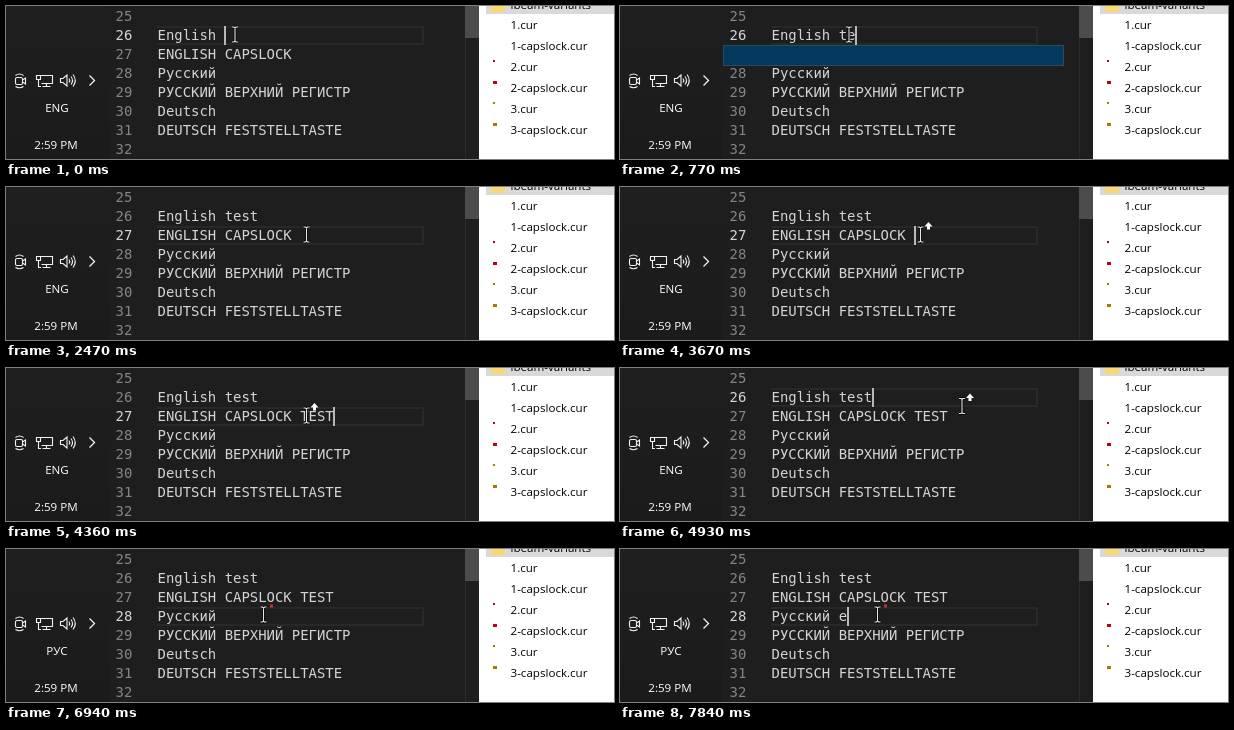
Recreate the animation shown at these times as an HTML page. Size 608x153 px, loop 7.99 s.

```html
<!DOCTYPE html>
<html lang="en">
<head>
<meta charset="utf-8">
<title>Text cursor by input language</title>
<style>
html, body { margin: 0; width: 100%; height: 100%; overflow: hidden; background: #1e1e1e; }
#stage { position: relative; width: 608px; height: 153px; overflow: hidden; background: #1e1e1e; }
#stage div, #stage svg { position: absolute; }
.ui { font: 11.6px/20px "Open Sans", "Noto Sans", sans-serif; white-space: pre; }
.tray { left: 0; top: 0; width: 103px; height: 153px; background: linear-gradient(#1f1f1f, #1b1b1c); }
.tray .ui { left: 0; width: 102px; color: #fff; text-align: center; }
.row { left: 0; height: 19px; font: 13.95px/19px "DejaVu Sans Mono", "Noto Sans Mono", monospace; white-space: pre; }
.num { left: 109.5px; color: #858585; }
.num.on { color: #d6d6d6; }
.code { left: 151.5px; color: #d4d4d4; }
#line { left: 151px; width: 265px; height: 15px; border: solid #282828; border-width: 2px 2px 2px 0; }
#caret { width: 2px; height: 19px; background: #b8b9b7; }
#popup { left: 103px; top: 39px; width: 341px; height: 21px; box-sizing: border-box; background: #04395e; border: 1px solid #2b4a62; }
.ruler { left: 459px; top: 0; width: 1px; height: 153px; background: #2b2b2b; }
.thumb { left: 459px; top: 0; width: 14px; height: 32px; background: #4c4c4c; }
.files { left: 473px; top: 0; width: 135px; height: 153px; background: #fff; overflow: hidden; }
.files .ui { left: 31.5px; color: #000; }
.head { left: 7px; top: 0; width: 128px; height: 8px; background: #d9d9d9; }
.folder { left: 12px; top: 0; width: 14px; height: 6px; background: #f8d775; }
.dot { left: 14px; width: 2px; height: 2px; }
.dot.caps { width: 4px; height: 3px; }
#pointer { left: 0; top: 0; overflow: visible; }
</style>
</head>
<body>
<div id="stage">
  <div id="line"></div>
  <div id="rows"></div>
  <div id="caret"></div>
  <div id="popup"></div>
  <div class="ruler"></div>
  <div class="thumb"></div>
  <div class="tray">
    <svg width="103" height="153" fill="none" stroke="#f0f0f0" stroke-width="1.1">
      <rect x="9.5" y="71.5" width="7" height="7" rx="1.5"/>
      <path d="M16.5 74l3-2v6l-3-2M9.5 69.5q4-3 8 0M9.5 80.5q4 2.5 8 0"/>
      <path d="M33.5 69.5H46.5V77.5H35.5M40.5 77.5V80.5M36.5 80.5H44.5M30.5 69.5H34.5V73.5H30.5ZM32.5 73.5V80.5H35"/>
      <path d="M54.5 72.5H57L61 69V80L57 76.5H54.5ZM63 72.5q1.5 2 0 4M65 70.5q3 4 0 8M67 68.5q4.5 6 0 12"/>
      <path d="M83.5 69.5l5 5l-5 5" stroke-width="1.3"/>
    </svg>
    <div class="ui" id="lang" style="top:92px"></div>
    <div class="ui" style="top:129px; left:-1px">2:59 PM</div>
  </div>
  <div class="files" id="files">
    <div class="head"></div>
    <div class="folder"></div>
    <div class="ui" style="top:-11px">ibeam-variants</div>
  </div>
  <svg id="pointer" width="1" height="1">
    <defs>
      <path id="beam" fill="none" d="M-3 -7.5H-1L0 -6.5L1 -7.5H3M0 -6.5V6.5M-3 7.5H-1L0 6.5L1 7.5H3"/>
    </defs>
    <use href="#beam" stroke="#000" stroke-width="2.6"/>
    <use href="#beam" stroke="#e8e8e8" stroke-width="1.1"/>
    <path id="arrow" d="M8 -12.5L12 -8H9.5V-5H6.5V-8H4Z"/>
    <rect id="mark" x="6.5" y="-10" width="3" height="3" fill="#c8322c"/>
  </svg>
</div>
<script>
const $ = id => document.getElementById(id);
const LOOP = 7990, CHAR = 8.4, LEFT = 151;
const rowTop = n => 1 + (n - 25) * 19;

function add(parent, cls, y, text = "") {
  const el = document.createElement("div");
  el.className = cls;
  el.style.top = y + "px";
  el.textContent = text;
  parent.appendChild(el);
  return el;
}

const base = {
  26: "English ", 27: "ENGLISH CAPSLOCK ", 28: "Русский ",
  29: "РУССКИЙ ВЕРХНИЙ РЕГИСТР", 30: "Deutsch", 31: "DEUTSCH FESTSTELLTASTE"
};
const nums = {}, code = {};
for (let n = 25; n <= 32; n++) {
  nums[n] = add($("rows"), "row num", rowTop(n), n);
  code[n] = add($("rows"), "row code", rowTop(n), base[n]);
}

const dotColours = ["", "#c00018", "#a87800"];
dotColours.forEach((colour, i) => ["", "-capslock"].forEach((suffix, j) => {
  const y = 9 + (i * 2 + j) * 21;
  add($("files"), "ui", y, i + 1 + suffix + ".cur");
  if (colour) add($("files"), j ? "dot caps" : "dot", y + 3).style.background = colour;
}));

// Each step changes only the listed fields.
const steps = [
  [0, { line: 26, caret: 1, x: 229, y: 28.5, t26: "", t27: "", t28: "", popup: 0, lang: "ENG", arrow: "", mark: 0 }],
  [250, { caret: 0 }],
  [770, { caret: 1, t26: "te", popup: 1 }],
  [890, { t26: "tes" }],
  [1020, { t26: "test" }],
  [1150, { popup: 0 }],
  [1290, { x: 246, y: 33 }],
  [1420, { x: 281, y: 41 }],
  [1560, { x: 298, y: 44, caret: 0 }],
  [1700, { x: 300, y: 47, line: 27, caret: 1 }],
  [1830, { x: 300.5, y: 47.5 }],
  [2100, { caret: 0 }],
  [2620, { caret: 1 }],
  [2780, { arrow: "#fff" }],
  [3150, { caret: 0 }],
  [3670, { caret: 1 }],
  [3960, { t27: "T" }],
  [4090, { t27: "TE" }],
  [4230, { t27: "TES" }],
  [4360, { t27: "TEST" }],
  [4500, { x: 308, y: 45 }],
  [4640, { x: 326, y: 41 }],
  [4780, { x: 340, y: 38.5 }],
  [4930, { x: 342, y: 38, line: 26 }],
  [5090, { x: 326, y: 45 }],
  [5220, { x: 288, y: 57 }],
  [5350, { x: 262, y: 64, caret: 0 }],
  [5480, { x: 257.5, y: 65.5, line: 28, caret: 1 }],
  [5990, { caret: 0 }],
  [6370, { lang: "РУС" }],
  [6510, { caret: 1, arrow: "#d8302c" }],
  [6940, { caret: 0, arrow: "", mark: 1 }],
  [7440, { caret: 1 }],
  [7840, { t28: "е" }]
];

const show = (el, on) => { el.style.visibility = on ? "visible" : "hidden"; };

function draw(s) {
  for (const n of [26, 27, 28]) {
    code[n].textContent = base[n] + s["t" + n];
    nums[n].classList.toggle("on", n === s.line);
  }
  const y = rowTop(s.line);
  $("line").style.top = y + "px";
  $("caret").style.top = y + "px";
  $("caret").style.left = Math.round(LEFT + code[s.line].textContent.length * CHAR) + "px";
  show($("caret"), s.caret);
  show($("popup"), s.popup);
  $("lang").textContent = s.lang;
  $("pointer").style.transform = `translate(${s.x}px, ${s.y}px)`;
  $("arrow").setAttribute("fill", s.arrow || "none");
  show($("mark"), s.mark);
}

let last = -1;
function tick() {
  const t = performance.now() % LOOP;
  const past = steps.filter(([at]) => at <= t);
  if (past.length !== last) {
    last = past.length;
    draw(Object.assign({}, ...past.map(([, change]) => change)));
  }
  requestAnimationFrame(tick);
}
tick();
</script>
</body>
</html>
```
